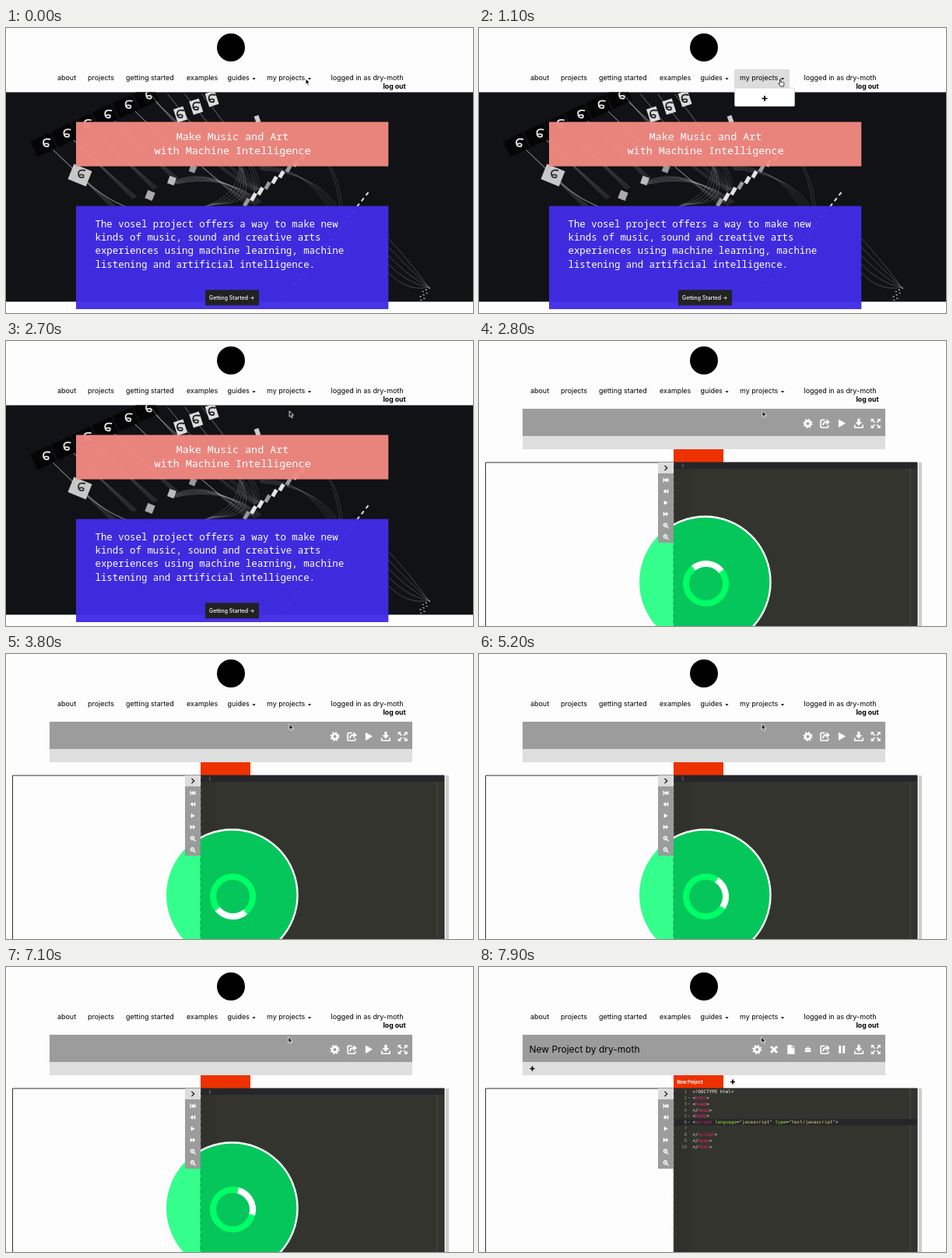
Write an HTML page that moves like this. It is 600 by 366 pixels and loops after 8000 ms.

```html
<!DOCTYPE html>
<html lang="en">
<head>
<meta charset="utf-8">
<title>Project page</title>
<style>
html, body { margin: 0; width: 100%; height: 100%; overflow: hidden; background: #fdfdfd; }
svg { display: block; width: 100vw; height: 100vh; }
text { font-family: Inter, Roboto, sans-serif; white-space: pre; }
.mono { font-family: "Noto Sans Mono", "DejaVu Sans Mono", monospace; font-weight: 500; fill: #fff; }
.code { font: 5.87px "DejaVu Sans Mono", "Liberation Mono", monospace; fill: #f8f8f2; }
.nav { font-size: 8.95px; font-weight: 400; }
.tag { fill: #f92672; } .attr { fill: #a6e22e; } .str { fill: #e6db74; } .num { fill: #8f908a; }
</style>
</head>
<body>
<svg id="stage" viewBox="0 0 600 366" preserveAspectRatio="none">
  <defs>
    <clipPath id="heroClip"><rect y="82.500" width="600" height="269"/></clipPath>
    <clipPath id="leftClip"><rect y="150" width="250" height="216"/></clipPath>
    <g id="gear" fill="none" stroke="#fff">
      <circle r="3.3" stroke-width="2.7"/>
      <circle r="5.1" stroke-width="2" stroke-dasharray="2 2.005"/>
    </g>
    <g id="share" fill="none" stroke="#fff" stroke-width="1.6">
      <path d="M0-4.6H-3.5Q-5.3-4.6-5.3-3V3.4Q-5.3 5.2-3.5 5.2H2.5Q4.4 5.2 4.4 3.4V2"/>
      <path d="M-2.4 2.2Q-2.2-2 2.5-2" stroke-width="2"/>
      <path d="M2-6L6.5-2L2 2Z" fill="#fff" stroke="none"/>
    </g>
    <path id="play" d="M-4.2-5.5L5-.2L-4.2 5.2Z" fill="#fff"/>
    <path id="pause" d="M-4-5H-1V5H-4ZM1-5H4V5H1Z" fill="#fff"/>
    <path id="download" d="M-1.6-6.3H1.6V-1.8H4.5L0 2.8L-4.5-1.8H-1.6ZM-6 1.5H-4.4V4.4H4.4V1.5H6V6H-6Z" fill="#fff"/>
    <g id="expand" fill="#fff" stroke="#fff">
      <path d="M-6-6H-1.7L-6-1.7ZM6-6V-1.7L1.7-6ZM-6 6V1.7L-1.7 6ZM6 6H1.7L6 1.7Z" stroke="none"/>
      <path d="M-4.5-4.5L-1.3-1.3M4.5-4.5L1.3-1.3M-4.5 4.5L-1.3 1.3M4.5 4.5L1.3 1.3" stroke-width="1.7"/>
    </g>
    <path id="close" d="M-4-4L4 4M4-4L-4 4" stroke="#fff" stroke-width="3"/>
    <path id="file" d="M-4.5-6H1V-1.8H4.7V6H-4.5ZM2-6L4.7-2.8H2Z" fill="#fff"/>
    <path id="case" d="M-3.8-1.8H-1.7V-3.2H1.7V-1.8H3.8V.2H-3.8ZM-3.8 .8H3.8V3.2H-3.8ZM-.9-2.4V-1.8H.9V-2.4Z" fill="#fff" fill-rule="evenodd"/>
    <path id="first" d="M-3.5-3H-2.3V3H-3.5ZM-2.3 0L.7-3V3ZM.4 0L3.5-3V3Z" fill="#fff"/>
    <path id="back" d="M-3.4 0L0-3V3ZM-.1 0L3.3-3V3Z" fill="#fff"/>
    <path id="run" d="M-2.4-2.9L2.8 0L-2.4 2.9Z" fill="#fff"/>
    <path id="forward" d="M3.4 0L0-3V3ZM.1 0L-3.3-3V3Z" fill="#fff"/>
    <path id="zoomOut" d="M1.2 1.2L3.6 3.6M1.7-.6A2.3 2.3 0 1 1-2.9-.6A2.3 2.3 0 1 1 1.7-.6M-1.8-.6H.6" fill="none" stroke="#fff" stroke-width="1.1"/>
    <g id="zoomIn"><use href="#zoomOut"/><path d="M-.6-1.8V.6" stroke="#fff"/></g>
  </defs>
  <rect width="600" height="366" fill="#fdfdfd"/>

  <g id="home">
    <rect y="82.500" width="600" height="269" fill="#111216"/>
    <g id="photo" clip-path="url(#heroClip)"></g>
    <rect x="90" y="120.600" width="401.300" height="57" fill="#f28982" opacity=".96"/>
    <rect x="90" y="228.600" width="401.300" height="132.400" fill="#412ce6" opacity=".96"/>
    <g font-size="13.4" text-anchor="middle">
      <text class="mono" x="291" y="143.500">Make Music and Art</text>
      <text class="mono" x="291" y="161.500">with Machine Intelligence</text>
    </g>
    <g id="intro" font-size="12.4"></g>
    <rect x="256" y="336.300" width="69" height="20" fill="#222"/>
    <text x="261" y="348.800" font-size="6.9" font-weight="500" fill="#fff">Getting Started →</text>
  </g>

  <g id="editor">
    <rect x="56" y="87" width="466" height="35" fill="#9c9c9c"/>
    <rect x="56" y="122" width="466" height="17" fill="#dedede"/>
    <rect x="250" y="139" width="64" height="17" fill="#ee3100"/>
    <path d="M250 156H8.500V370" fill="none" stroke="#333" stroke-width="1"/>
    <rect x="565" y="156" width="4" height="210" fill="#d0cccb"/>
    <rect x="250" y="156" width="313" height="210" fill="#33342e"/>
    <rect x="250" y="156" width="21" height="210" fill="#2f312a"/>
    <path d="M250 156H563V366" fill="none" stroke="#25262a"/>
    <path d="M554 156V366" stroke="#4b4c46"/>
    <rect id="activeLine" x="250" width="313" height="8" fill="#25262a"/>
    <path d="M250 156V366" stroke="#777" stroke-dasharray="5 3"/>
    <g id="loader">
      <circle cx="290.500" cy="309.500" r="84" fill="#05c65a" stroke="#fff" stroke-width="2.4"/>
      <circle cx="290.500" cy="309.500" r="84.500" fill="#35ff8c" clip-path="url(#leftClip)"/>
      <path d="M250 238V366" stroke="#159a54" stroke-dasharray="5 3"/>
      <circle cx="291.500" cy="311.500" r="25.500" fill="none" stroke="#00ff66" stroke-width="8"/>
      <path id="arc" d="M18.030-18.030A25.500 25.500 0 0 1 18.030 18.030" fill="none" stroke="#fff" stroke-width="8"/>
    </g>
    <rect x="230" y="156" width="20" height="103" fill="#999" opacity=".97"/>
    <rect x="230" y="156" width="20" height="14" fill="#dcdcdc"/>
    <path d="M238.500 160L241.800 163L238.500 166" fill="none" stroke="#111" stroke-width="1.1"/>
    <g id="sideIcons"></g>
    <g id="barIcons"></g>
    <g id="loaded">
      <text x="64.500" y="109.500" font-size="12">New Project by dry-moth</text>
      <path d="M65.500 130.500H71.500M68.500 127.500V133.500M323 147.500H329M326 144.500V150.500" stroke="#000" stroke-width="1.7"/>
      <text x="254.500" y="149.800" font-size="5.6" font-weight="700" fill="#fff">New Project</text>
      <g id="loadedIcons"></g>
      <g id="codeLines"></g>
    </g>
    <text id="lineOne" class="code num" x="263.500" y="162" text-anchor="end">1</text>
  </g>

  <circle cx="289" cy="25" r="18" fill="#000"/>
  <g id="menu">
    <rect x="328" y="53" width="71" height="24" fill="#ddd"/>
    <rect x="328.500" y="77" width="77" height="23.500" rx="1.500" fill="#fff" stroke="#ccc" stroke-width=".7"/>
    <path d="M363.500 90.500H370.500M367 87V94" stroke="#000" stroke-width="1.7"/>
  </g>
  <g id="nav"></g>
  <path d="M316.300 64.300H320.700L318.500 66.500ZM387.800 64.300H392.200L390 66.500Z"/>
  <text x="484.500" y="77.500" font-size="8.7" font-weight="700">log out</text>

  <g id="pointer">
    <path id="arrow" d="M0 0V7.600L1.700 6L3 9L4.400 8.400L3.100 5.500H5.500Z" fill="#111" stroke="#fff" stroke-width=".8"/>
    <path id="hand" d="M1 0Q2-.6 2.400.6V3.200L5.500 4Q6.700 4.300 6.500 5.700L5.800 9H2L-.7 5.800Q-1 4.800.3 5L1 5.600Z" fill="#fff" stroke="#111" stroke-width=".8"/>
  </g>
</svg>
<script>
const LOOP = 8000, STEP = 100;
const MENU_OPEN = 400, MENU_CLOSE = 2300, EDITOR_OPEN = 2800, LOADED = 7600;
const $ = id => document.getElementById(id);
const show = (id, on) => $(id).setAttribute("display", on ? "inline" : "none");
const lerp = (a, b, k) => a + (b - a) * k;

$("nav").innerHTML = [
  [66, "about"], [105, "projects"], [154, "getting started"], [232, "examples"],
  [284.5, "guides"], [335, "my projects"], [417.5, "logged in as dry-moth"]
].map(([x, label]) => `<text class="nav" x="${x}" y="67">${label}</text>`).join("");

$("intro").innerHTML = [
  "The vosel project offers a way to make new",
  "kinds of music, sound and creative arts",
  "experiences using machine learning, machine",
  "listening and artificial intelligence."
].map((line, i) => `<text class="mono" x="114.500" y="${255.5 + i * 17.4}">${line}</text>`).join("");

const icons = (names, x, y, dx, dy) => names.map((name, i) =>
  `<use href="#${name}" x="${x + i * dx}" y="${y + i * dy}"/>`).join("");
$("sideIcons").innerHTML = icons(["first", "back", "run", "forward", "zoomIn", "zoomOut"], 240, 178.5, 0, 14.6);
$("barIcons").innerHTML = icons(["gear", "share", "play", "download", "expand"], 422.5, 106, 21.8, 0);
$("loadedIcons").innerHTML = icons(
  ["gear", "close", "file", "case", "share", "pause", "download", "expand"], 357.2, 106, 21.8, 0);

// Source listing with a light syntax highlighter.
const source = ["<!DOCTYPE html>", "<html>", "<head>", "</head>", "<body>",
  '<script language="javascript" type="text/javascript">', "", "<\/script>", "</body>", "</html>"];
const escape = s => s.replace(/</g, "&lt;").replace(/>/g, "&gt;");
const span = (kind, s) => `<tspan class="${kind}">${s}</tspan>`;
const highlight = line => line.replace(/"[^"]*"|[a-z]+(?==)|<\/?|>|[a-z]+/g, token =>
  token[0] === '"' ? span("str", token)
  : token === "language" || token === "type" ? span("attr", token)
  : /^[a-z]/.test(token) ? span("tag", token) : escape(token));
$("codeLines").innerHTML = source.map((line, i) => {
  const y = 162 + i * 7.87;
  const fold = [1, 2, 4, 5].includes(i) ? `<path d="M268.800 ${y - 2.5}h2l-1 1.300z" fill="#8f908a"/>` : "";
  return `<text class="code num" x="267" y="${y}" text-anchor="end">${i + 1}</text>${fold}
    <text class="code" x="274.500" y="${y}">${i ? highlight(line) : escape(line)}</text>`;
}).join("");

// Abstract backdrop: tilted tiles joined by bundles of thin curves.
const tile = (x, y, w, h, angle, fill) =>
  `<rect x="${-w / 2}" y="${-h / 2}" width="${w}" height="${h}" fill="${fill}" transform="translate(${x} ${y}) rotate(${angle})"/>`;
const row = (n, x, y, dx, dy, draw) =>
  Array.from({ length: n }, (_, i) => draw(x + dx * i, y + dy * i, i)).join("");
const curve = (x1, y1, x2, y2, bendX, bendY, opacity) =>
  `<path d="M${x1} ${y1}Q${bendX} ${bendY} ${x2} ${y2}" fill="none" stroke="#d5d7dc" stroke-width=".6" opacity="${opacity}"/>`;
const bundle = (n, x1, y1, x2, y2, bendX, bendY, spread, opacity) =>
  row(n, 0, 0, spread, spread * .7, (a, b) =>
    curve(x1 + a * .15, y1 + b * .3, x2 + a * .5, y2 - b * .4, bendX + a, bendY + b, opacity));
const glyph = (x, y, color) =>
  `<path d="M${x + 5} ${y - 5}q-9-2-9 4t6 5q3-5-6-3" fill="none" stroke="${color}" stroke-width="1.8"/>`;
const glyphTile = (x, y) => tile(x - 4, y + 2, 27, 22, -25, "#050506") + glyph(x, y, "#e8e8e8");

$("photo").innerHTML =
  row(6, 52, 148, 26.4, -12.3, (x, y) =>
    bundle(4, x, y, x + 85, y + 84, x + 40, y + 40, 3, .4)) +
  row(6, 52, 148, 26.4, -12.3, glyphTile) +
  row(4, 185, 84, 22, 0, (x, y) => bundle(3, x, y, 320, 210, x + 70, y + 90, 5, .3)) +
  bundle(4, 95, 190, 180, 240, 130, 225, 4, .35) +
  bundle(5, 215, 197, 320, 228, 265, 175, 4, .45) +
  bundle(5, 300, 176, 250, 232, 300, 215, 6, .4) +
  bundle(4, 250, 176, 310, 228, 275, 200, 5, .4) +
  bundle(4, 325, 178, 415, 232, 380, 175, 6, .3) +
  bundle(2, 393, 150, 430, 240, 425, 175, 5, .3) +
  row(5, 491, 270, 0, 11, (x, y) => curve(x, y, 543, 333, 515, y + 25, .45)) +
  row(3, 224, 111, 20.3, -10, (x, y) => tile(x, y, 13, 18, -18, "#dcdcdc") + glyph(x, y, "#222")) +
  tile(95, 189, 25, 21, 22, "#c8c8c8") + glyph(97, 188, "#333") +
  tile(185, 215, 10, 11, 22, "#aaa") + tile(213, 196, 9, 10, 20, "#bbb") +
  tile(240, 181, 8, 9, 20, "#999") + tile(323, 117, 6, 9, -20, "#ccc") +
  row(10, 309, 224, 9, -7.2, (x, y, i) => tile(x, y, 5, 11 - i * .3, 30, i % 3 ? "#e4e4e4" : "#999")) +
  row(20, 464, 213, -5.8, 7.3, (x, y) => tile(x, y, 2, 5, 38, "#ddd")) +
  row(8, 544, 334, -1.1, 2.2, (x, y, i) => tile(x - (i % 3) * 3, y, 2.2, 1.2, 20, "#bbb"));

function pointerAt(t) {
  if (t < 1300) {
    const k = Math.min(1, t / MENU_OPEN);
    return [lerp(385, 385.5, k), lerp(65, 66, k)];
  }
  if (t < 1900) {
    const k = (t - 1300) / 600, eased = k * k * (3 - 2 * k);
    return [lerp(385.5, 364, eased), lerp(66, 89.5, eased)];
  }
  return [t < 4600 ? 364 : t < 5500 ? 363.3 : 362.7, 89.8];
}

function render(time) {
  const t = Math.floor((time % LOOP) / STEP) * STEP;
  const menu = t >= MENU_OPEN && t < MENU_CLOSE;
  const editor = t >= EDITOR_OPEN, loaded = t >= LOADED;
  show("home", !editor);
  show("editor", editor);
  show("menu", menu);
  show("loader", editor && !loaded);
  show("barIcons", !loaded);
  show("loaded", loaded);
  show("lineOne", !loaded);
  show("arrow", !menu);
  show("hand", menu);
  $("activeLine").setAttribute("y", loaded ? 195.3 : 156);
  $("arc").setAttribute("transform", `translate(291.5 311.5) rotate(${96 + (t - 3800) * .18})`);
  $("pointer").setAttribute("transform", `translate(${pointerAt(t)})`);
}

const start = performance.now();
function tick() {
  render(performance.now() - start);
  requestAnimationFrame(tick);
}
tick();
</script>
</body>
</html>
```
